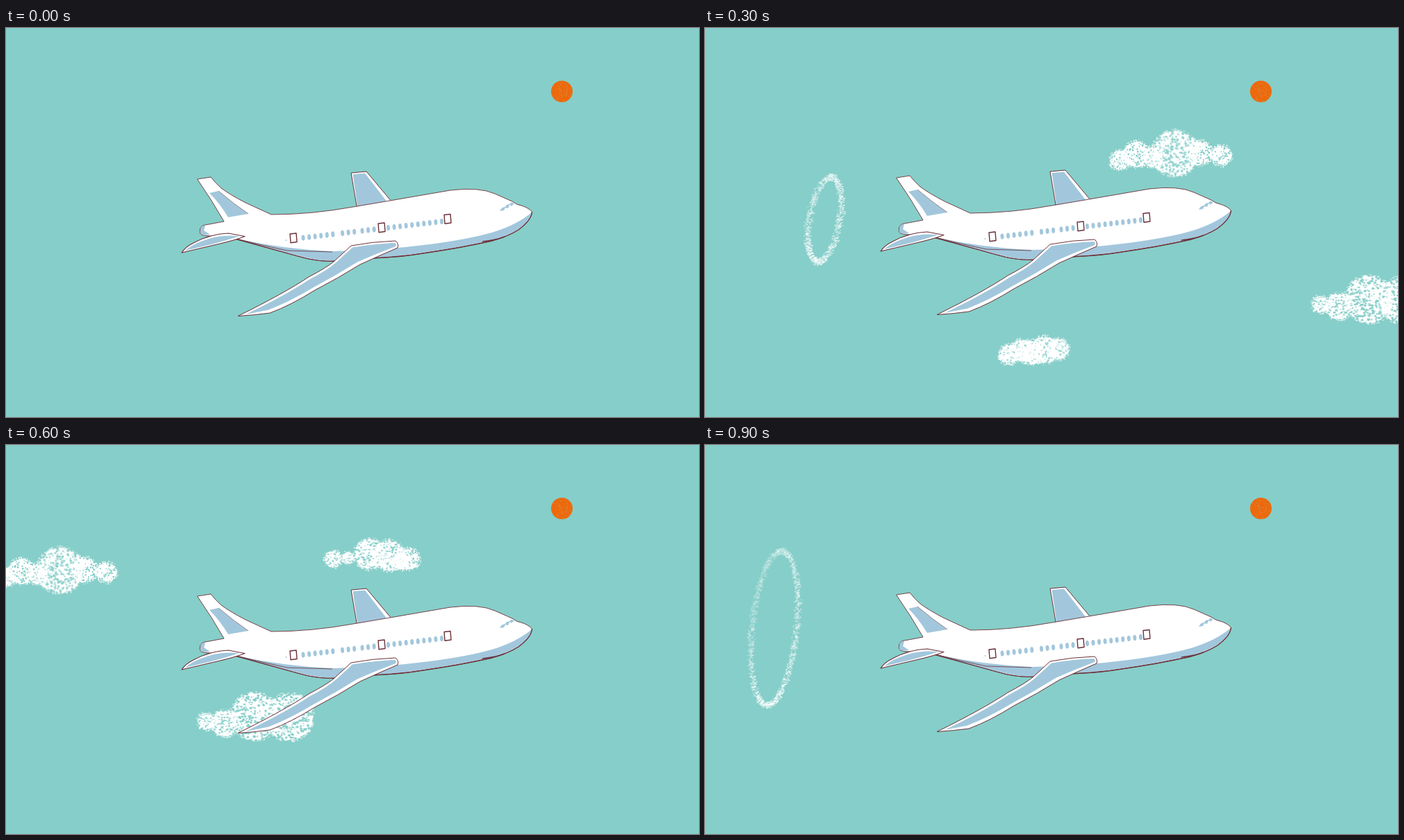
An HTML page with a canvas that plays this animation: 998 by 561 pixels, repeating every 1000 ms.

```html
<!DOCTYPE html>
<html lang="en">
<head>
<meta charset="utf-8">
<title>Plane in the clouds</title>
<style>
html, body { margin: 0; width: 100%; height: 100%; overflow: hidden; background: #86cec9; }
canvas { display: block; }
</style>
</head>
<body>
<canvas id="stage" width="998" height="561"></canvas>
<script>
const W = 998, H = 561, STEP = 100, STEPS = 10, CLOUD_SPEED = 199.4;
const SKY = '#86cec9', BLUE = '#a2c7dc', INK = '#6a3039', SUN = '#ec690c';
const ctx = document.getElementById('stage').getContext('2d');

function seeded(seed) {
  return () => {
    seed = (seed + 0x6d2b79f5) | 0;
    let t = Math.imul(seed ^ (seed >>> 15), 1 | seed);
    t = (t + Math.imul(t ^ (t >>> 7), 61 | t)) ^ t;
    return ((t ^ (t >>> 14)) >>> 0) / 4294967296;
  };
}

function layer(w = W, h = H) {
  const c = document.createElement('canvas');
  c.width = w;
  c.height = h;
  return c.getContext('2d');
}

function dot(g, x, y, rx, ry = rx, turn = 0) {
  g.beginPath();
  g.ellipse(x, y, rx, ry, turn, 0, Math.PI * 2);
  g.fill();
}

// A chalky disc: ragged rim and punched-out grain
function puff(r, rand) {
  const size = Math.ceil(r * 2 + 10), m = size / 2, g = layer(size, size);
  g.fillStyle = '#fff';
  dot(g, m, m, r - 1.2);
  const speck = (dist, radius) => {
    const a = rand() * Math.PI * 2;
    dot(g, m + Math.cos(a) * dist, m + Math.sin(a) * dist, radius);
  };
  for (let i = 0; i < r * 4; i++) speck(r - 1.5 + rand() * 2.2, 0.4 + rand() * 0.6);
  g.globalCompositeOperation = 'destination-out';
  for (let i = 0; i < r * r * 0.3; i++) {
    speck(r * Math.sqrt(rand()), 0.4 + rand() * (0.5 + r / 38));
  }
  for (let i = 0; i < r * 2; i++) speck(r - rand() * 2, 0.4 + rand() * 0.7);
  return g.canvas;
}

function cloud(seed, home, puffs) {
  const rand = seeded(seed), g = layer();
  for (const [x, y, r] of puffs) {
    const c = puff(r, rand);
    g.drawImage(c, x - c.width / 2, y - c.height / 2);
  }
  return { home, image: g.canvas };
}

// Smoke ring made of short slanted chalk strokes
function ring(seed, x, y, a, b, tilt, width, strength, fade) {
  const rand = seeded(seed), g = layer();
  g.translate(x, y);
  g.rotate(tilt);
  g.strokeStyle = '#fff';
  g.lineWidth = 1;
  const count = Math.PI * (a + b) * width * 0.3;
  for (let i = 0; i < count; i++) {
    const t = rand() * Math.PI * 2;
    const off = (rand() + rand() * 0.6 - 0.8) * width / 1.6;
    const px = Math.cos(t) * (a + off), py = Math.sin(t) * (b + off);
    const thin = 0.5 + 0.5 * Math.cos(t - Math.PI * 1.3);
    g.globalAlpha = strength * (1 - fade * thin) * (0.5 + rand() * 0.5);
    const lean = rand() < 0.7 ? 1 : -1;
    g.beginPath();
    g.moveTo(px - 1.2, py + lean * 0.9);
    g.lineTo(px + 1.2, py - lean * 0.9);
    g.stroke();
  }
  return g.canvas;
}

function shape(g, d, fill, line = 0) {
  const p = new Path2D(d);
  if (fill) {
    g.fillStyle = fill;
    g.fill(p);
  }
  if (line) {
    g.strokeStyle = INK;
    g.lineWidth = line;
    g.stroke(p);
  }
}

function makePlane() {
  const g = layer();
  g.lineJoin = 'round';

  // Far wing
  shape(g, 'M497 209L519 207L555 250L505 257Z', '#fff', 1);
  shape(g, 'M499.5 211L517 209.5L549 251L506 257Z', BLUE);

  // Body and fin
  const hull = 'M275.5 218L295 215Q302 224 310 231Q322 240 345 252L382 269' +
    'Q440 269 500 258L556 248.5L640 234Q682 229 704 239L730 250.5' +
    'Q735 255 742 256Q752 259 757.5 265Q757 277 738 291Q724 300 700 307' +
    'Q650 318 600 325Q570 330 535 331.5L478 336Q450 338 420 329L330 304' +
    'L284 299Q278 298 279.5 290Q281 284 290 283.5L314 279L296 249Z';
  shape(g, hull, '#fff', 0.9);
  shape(g, 'M332 304Q400 319 470 322Q540 321 610 312Q670 304 703 294' +
    'Q737 283 757 266Q756 277 738 290Q724 299 700 306Q650 317 600 324' +
    'Q570 329 535 331L478 335.5Q450 337 420 328Z', BLUE);
  shape(g, 'M280 290Q281 285 287 285L285 292L294 298L284 298.5Q279 297 280 290Z', BLUE);
  shape(g, 'M332 304Q376 315 405 321L470 323', null, 0.8);
  shape(g, 'M757.5 265Q757 277 738 291Q724 300 700 307Q650 318 600 325' +
    'Q570 330 535 331.5L478 336Q450 338 420 329L330 304', null, 1.3);
  shape(g, 'M686 308Q705 306 718 301', null, 1.5);
  shape(g, 'M293 238L306 235Q326 252 349 268L320 273Q308 253 293 238Z', BLUE);
  shape(g, 'M306 235Q326 252 349 268', null, 0.5);

  // Tailplane
  shape(g, 'M253 324Q258 316 270 310Q294 297 320 296L344 300.5Q330 306 304 312Z', '#fff', 1.1);
  shape(g, 'M258 321Q269 311 292 304Q310 298 336 300Q322 305 296 312Z', BLUE);

  // Cabin windows, leaving gaps at the doors
  g.fillStyle = BLUE;
  const rows = [[428, 6], [484.5, 3], [513, 3], [550.5, 10]];
  for (const [x0, n] of rows) {
    for (let i = 0; i < n; i++) {
      const x = x0 + i * 8.55;
      dot(g, x, 302.5 - (x - 428) * 0.118, 2.5, 4.1, -0.08);
    }
  }
  dot(g, 403.5, 306, 1);

  for (const [x, y] of [[409, 297], [536, 282], [631, 269.5]]) {
    shape(g, `M${x} ${y}l9 -1l1 12.5l-9 1.2z`, '#fff', 1.4);
  }

  // Cockpit
  shape(g, 'M711 264L714 259.5L720 257.5L717 263ZM718 259L721 255L726 254L723 260Z' +
    'M725 254L728 251.5L732 253L728 257Z', BLUE);

  // Near wing
  shape(g, 'M334 415.5Q400 383 436 359Q461 346 472 337L497 314Q528 308 561 307' +
    'Q566 311 564 317Q536 329 510 341Q478 361 445 378Q410 400 380 411' +
    'Q358 414 334 415.5Z', '#fff', 1);
  shape(g, 'M345 413Q400 387 438 362Q463 349 475 338.5L499 316.5Q530 311 560 310' +
    'Q563 312 561 315Q532 326 506 337.5Q475 357 443 374Q408 395 378 406.5Z', BLUE);
  return g.canvas;
}

function makeSky() {
  const g = layer(), rand = seeded(5);
  g.fillStyle = SKY;
  g.fillRect(0, 0, W, H);
  g.fillStyle = SUN;
  dot(g, 800.5, 91.5, 15.5);
  g.fillStyle = '#d98a48';
  for (let i = 0; i < 50; i++) {
    const a = rand() * Math.PI * 2, d = 15 * Math.sqrt(rand());
    dot(g, 800.5 + Math.cos(a) * d, 91.5 + Math.sin(a) * d, 0.5 + rand() * 0.3);
  }
  return g.canvas;
}

const sky = makeSky();
const plane = makePlane();
// "home" is the step at which a cloud stands where it was drawn
const clouds = [
  cloud(11, 2, [[796.5, 191, 15.5], [820, 182, 20], [844, 186, 16], [876, 181, 34.5], [911, 180, 20], [943, 184, 16]]),
  cloud(22, 2, [[636.5, 471, 16], [656, 465, 17.5], [668, 468, 19], [688, 464.5, 21], [708, 463, 16.5]]),
  cloud(33, 4, [[687, 398.5, 13.5], [714, 401.5, 20.5], [757, 391.5, 35.5], [807, 392.5, 35.5]]),
  cloud(44, 4, [[870, 164.5, 13.5], [891.5, 163, 10], [923, 157.5, 23.5], [951, 159.5, 23.5], [967, 168, 14], [979.5, 164.5, 16.5]])
];
const rings = [
  null,
  null,
  ring(7, 221.5, 278, 14.5, 36, 0.12, 14, 0.75, 0.1),
  ring(8, 172.5, 278, 22, 61.5, 0.18, 13, 0.72, 0.25),
  ring(9, 100, 266, 32, 111.5, 0.1, 12, 0.7, 0.6)
];

function draw(now) {
  const n = Math.floor(now / STEP) % STEPS;
  const bob = n % 2 ? -2 : 0;
  const smoke = rings[n % rings.length];
  ctx.drawImage(sky, 0, 0);
  for (const c of clouds) ctx.drawImage(c.image, Math.round((c.home - n) * CLOUD_SPEED), 0);
  if (smoke) ctx.drawImage(smoke, 0, bob);
  ctx.drawImage(plane, 0, bob);
}

let start;
function tick(now) {
  if (start === undefined) start = now;
  draw(now - start);
  requestAnimationFrame(tick);
}
draw(0);
requestAnimationFrame(tick);
</script>
</body>
</html>
```
